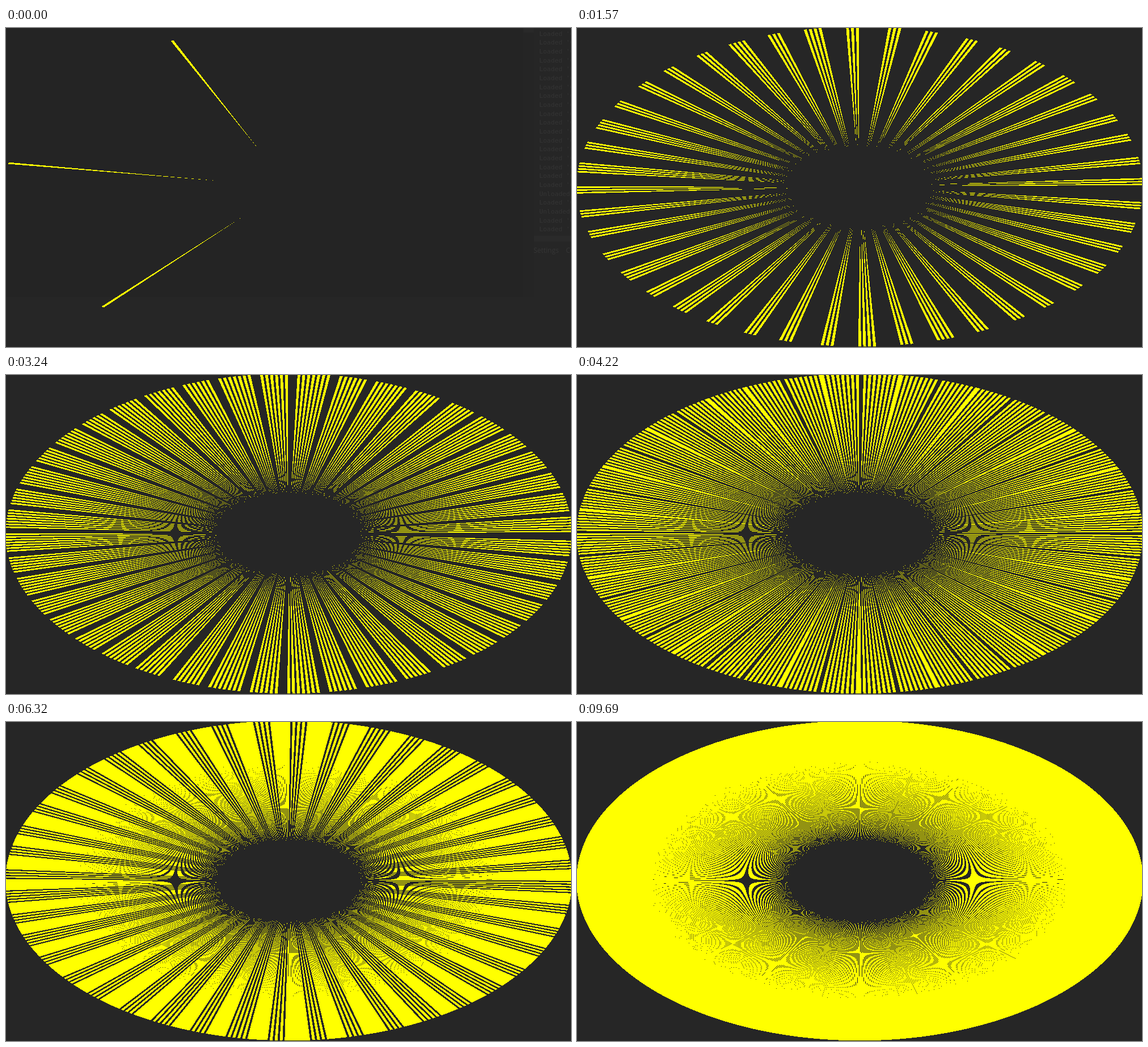
An HTML page with a canvas that plays this animation: 996x562 px, repeating every 9.79 s.

```html
<!DOCTYPE html>
<html lang="en">
<head>
<meta charset="utf-8">
<title>One-radian rays</title>
<style>
  html, body { margin: 0; width: 100%; height: 100%; overflow: hidden; background: #262626; }
  svg, canvas { position: absolute; left: 0; top: 0; width: 996px; height: 562px; }
  .log { font: 11.3px "DejaVu Sans Mono", monospace; fill: #343434; }
  .tab { font: 12px "Open Sans", sans-serif; fill: #363636; }
</style>
</head>
<body>
<svg id="desktop" viewBox="0 0 996 562">
  <rect width="930" height="474" fill="#242424"/>
  <rect x="912" width="18" height="474" fill="#252525"/>
  <rect x="912" width="18" height="8" fill="#292929"/>
  <rect x="931" y="366" width="65" height="10" fill="#2a2a2a"/>
  <g id="log" class="log"></g>
  <text class="tab" x="930" y="396">Settings</text>
  <text class="tab" x="987" y="396">Co</text>
</svg>
<canvas id="stage" width="996" height="562"></canvas>
<script>
const W = 996, H = 562, LOOP = 9790;
const CX = 498.5, CY = 279.3, RX = 499.5, RY = 282;
const INNER = 0.25, THICKNESS = 0.01, YELLOW = 0xff00ffff;

// Runs of evenly spaced picture changes: first ms, last ms, count.
const runs = [[0, 0, 1], [130, 240, 2], [390, 1360, 10], [1450, 2410, 10], [2530, 3240, 8],
  [3380, 4340, 10], [4430, 4720, 4], [4910, 5790, 9], [5900, 6320, 5], [6460, 6460, 1],
  [6610, 7550, 10], [7670, 8620, 10], [8720, 9690, 10]];
const steps = runs.flatMap(([first, last, count]) =>
  Array.from({ length: count }, (_, i) => first + (last - first) * i / (count - 1 || 1)));

// Time in ms and the highest ray number reached by then.
const progress = [[0, 4], [1570, 145], [3240, 286], [5350, 447], [6320, 524], [7670, 620], [9690, 776]];

const ctx = document.getElementById("stage").getContext("2d");
const image = ctx.createImageData(W, H);
const pixels = new Uint32Array(image.data.buffer);
const desktop = document.getElementById("desktop");

document.getElementById("log").innerHTML = Array.from({ length: 23 }, (_, i) =>
  `<text x="940" y="${13.5 + i * 15.68}">${i === 18 || i === 20 ? "Unloaded" : "Loaded 'C"}</text>`).join("");

function lastRay(time) {
  const i = progress.findIndex(([t]) => t >= time);
  if (i <= 0) return progress[0][1];
  const [t0, n0] = progress[i - 1], [t1, n1] = progress[i];
  return Math.round(n0 + (n1 - n0) * (time - t0) / (t1 - t0));
}

const polar = (angle, radius) =>
  [CX + RX * radius * Math.cos(angle), CY - RY * radius * Math.sin(angle)];

// Hard-edged fill: a pixel is lit when its centre lies inside the triangle.
function fillTriangle(points) {
  const ys = points.map(p => p[1]);
  const top = Math.max(0, Math.ceil(Math.min(...ys) - 0.5));
  const bottom = Math.min(H, Math.ceil(Math.max(...ys) - 0.5));
  for (let row = top; row < bottom; row++) {
    const y = row + 0.5;
    let left = Infinity, right = -Infinity;
    points.forEach(([x0, y0], i) => {
      const [x1, y1] = points[(i + 1) % 3];
      if ((y0 <= y) === (y1 <= y)) return;
      const x = x0 + (x1 - x0) * (y - y0) / (y1 - y0);
      left = Math.min(left, x);
      right = Math.max(right, x);
    });
    const from = Math.max(0, Math.ceil(left - 0.5));
    const to = Math.min(W, Math.ceil(right - 0.5));
    if (from < to) pixels.fill(YELLOW, row * W + from, row * W + to);
  }
}

function draw(time) {
  pixels.fill(0);
  for (let k = 2, last = lastRay(time); k <= last; k++) {
    fillTriangle([polar(k, INNER), polar(k - THICKNESS, 1), polar(k, 1)]);
  }
  ctx.putImageData(image, 0, 0);
  desktop.style.opacity = time < 130 ? 1 : time < 240 ? 0.3 : 0;
}

let shown = -1;
function tick() {
  const now = performance.now() % LOOP;
  const time = steps.filter(t => t <= now).pop();
  if (time !== shown) draw(shown = time);
  requestAnimationFrame(tick);
}
tick();
</script>
</body>
</html>
```
